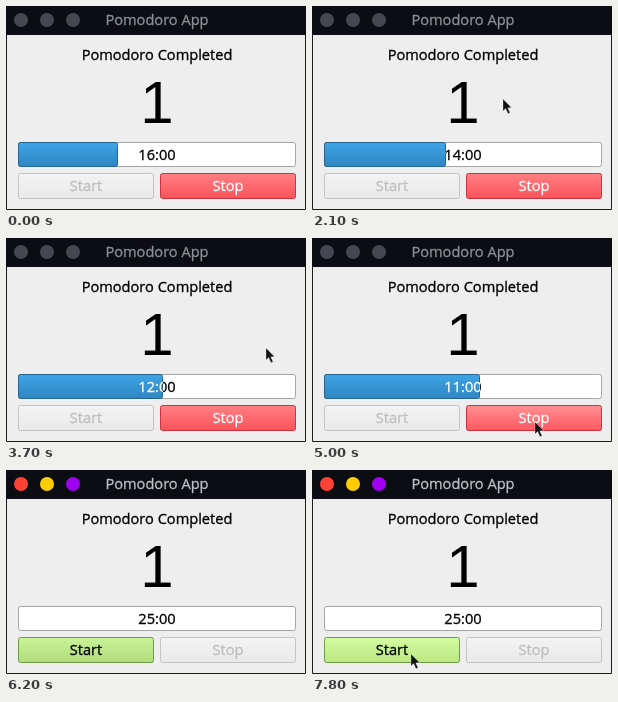
Animation, 300 px wide and 204 px high, one loop 8000 ms. Source, as an HTML page:

```html
<!DOCTYPE html>
<html lang="en">
<head>
<meta charset="utf-8">
<title>Pomodoro App</title>
<style>
  html, body { margin: 0; width: 100%; height: 100%; overflow: hidden; background: #eee; }
  svg { display: block; width: 100vw; height: 100vh; cursor: default; }
  text {
    font: 14.6px "Open Sans", "Noto Sans", sans-serif;
    text-anchor: middle; color: #000; fill: currentColor;
    stroke: currentColor; stroke-width: .3px;
  }
  .dot { fill: #454850; }
  .title { color: #8c8f98; }
  .active .title { color: #bcc0c8; }
  .active .close { fill: #ff4136; }
  .active .minimize { fill: #ffcc00; }
  .active .maximize { fill: #a000f0; }
  .count { font: 60px "Liberation Sans", Arial, sans-serif; stroke: none; }
  .button rect { fill: url(#disabled); stroke: #c4c4c4; }
  .button text { color: #bebebe; }
  .start.enabled rect { fill: url(#green); stroke: #72994a; }
  .start.enabled text { color: #000; }
  .start.enabled.hover rect { fill: url(#greenHover); }
  .stop.enabled rect { fill: url(#red); stroke: #cb3340; }
  .stop.enabled text, #bar text { color: #fff; }
  .stop.enabled.hover rect { fill: url(#redHover); }
  .stop.enabled.pressed rect { fill: #e8505a; }
</style>
</head>
<body>
<svg id="app" viewBox="0 0 300 204">
  <defs>
    <linearGradient id="disabled" x2="0" y2="1"><stop stop-color="#f3f3f3"/><stop offset="1" stop-color="#e9e9e9"/></linearGradient>
    <linearGradient id="green" x2="0" y2="1"><stop stop-color="#cbf299"/><stop offset="1" stop-color="#b0dc7a"/></linearGradient>
    <linearGradient id="greenHover" x2="0" y2="1"><stop stop-color="#d5fca1"/><stop offset="1" stop-color="#b9e781"/></linearGradient>
    <linearGradient id="red" x2="0" y2="1"><stop stop-color="#ff8083"/><stop offset="1" stop-color="#fb525a"/></linearGradient>
    <linearGradient id="redHover" x2="0" y2="1"><stop stop-color="#ff9092"/><stop offset="1" stop-color="#ff5860"/></linearGradient>
    <linearGradient id="blue" x2="0" y2="1"><stop stop-color="#3fa4e6"/><stop offset="1" stop-color="#2f86c2"/></linearGradient>
    <clipPath id="done"><rect id="doneClip" x="12" y="136" height="25"/></clipPath>
  </defs>

  <rect width="300" height="204" fill="#eee"/>
  <rect width="300" height="29" fill="#0b0d13"/>
  <path d="M.5 29V203.5H299.5V29" fill="none" stroke="#1c1c1e"/>
  <circle class="dot close" cx="15" cy="14" r="7"/>
  <circle class="dot minimize" cx="41" cy="14" r="7"/>
  <circle class="dot maximize" cx="67" cy="14" r="7"/>
  <text class="title" x="151" y="19">Pomodoro App</text>

  <text x="151" y="54">Pomodoro Completed</text>
  <text class="count" x="151" y="117">1</text>

  <rect x="12.5" y="136.5" width="277" height="24" rx="2" fill="#fff" stroke="#a5a5a5"/>
  <text class="clock" x="151" y="154"></text>
  <g id="bar">
    <rect id="chunk" x="12.5" y="136.5" height="24" rx="2" fill="url(#blue)" stroke="#27638f"/>
    <text class="clock" x="151" y="154" clip-path="url(#done)"></text>
  </g>

  <g id="start" class="button start">
    <rect x="12.5" y="167.5" width="135" height="25" rx="2"/>
    <text x="80" y="185">Start</text>
  </g>
  <g id="stop" class="button stop">
    <rect x="154.5" y="167.5" width="135" height="25" rx="2"/>
    <text x="222" y="185">Stop</text>
  </g>

  <path id="pointer" d="M0 0V12L2.7 9.6L5 14.7L7 13.8L4.8 8.9L8.4 8.5Z"
        fill="#141414" stroke="#fff" stroke-opacity=".45" stroke-width=".6"/>
</svg>

<script>
const LOOP = 8000, CLICK = 5400, RESET = 5600, LEAVE = 6200, RETURN = 6500;
const TICK = 100, TOTAL = 25;
const $ = id => document.getElementById(id);
const clocks = document.querySelectorAll(".clock");

// Places the pointer reaches, and how long each move takes.
const stops = [
  { at: 1900, over: 100, x: 186, y: 64 },
  { at: 2100, over: 100, x: 191, y: 93 },
  { at: 3200, over: 400, x: 203, y: 97 },
  { at: 3700, over: 400, x: 260, y: 110 },
  { at: 5000, over: 500, x: 223, y: 184 },
  { at: RETURN, over: 100, x: 102, y: 176 },
  { at: 7100, over: 600, x: 96, y: 161 },
  { at: 7800, over: 700, x: 99, y: 184 }
];

const clamp = p => Math.min(1, Math.max(0, p));
const ease = p => p * p * (3 - 2 * p);

function pointerAt(time) {
  const t = Math.floor(time / TICK) * TICK;
  if (t < stops[0].at || (t >= LEAVE && t < RETURN)) return null;
  let { x, y } = stops[0];
  for (const stop of stops) {
    const p = ease(clamp(1 - (stop.at - t) / stop.over));
    x += (stop.x - x) * p;
    y += (stop.y - y) * p;
  }
  return { x: Math.round(x), y: Math.round(y) };
}

function setButton(id, enabled, pointer, left) {
  const inside = pointer && pointer.x >= left && pointer.x < left + 136
    && pointer.y >= 167 && pointer.y < 193;
  $(id).classList.toggle("enabled", enabled);
  $(id).classList.toggle("hover", Boolean(inside));
}

function render(t) {
  const running = t < RESET;
  const minutes = running ? 16 - Math.floor((t + 400) / 1000) : TOTAL;
  const width = Math.round(278 * (TOTAL - minutes) / TOTAL);
  clocks.forEach(clock => clock.textContent = minutes + ":00");
  $("bar").style.display = running ? "" : "none";
  $("chunk").setAttribute("width", Math.max(0, width - 1));
  $("doneClip").setAttribute("width", width);

  const pointer = pointerAt(t);
  $("pointer").style.display = pointer ? "" : "none";
  if (pointer) $("pointer").setAttribute("transform", `translate(${pointer.x} ${pointer.y})`);

  $("app").classList.toggle("active", t >= CLICK);
  setButton("start", !running, pointer, 12);
  setButton("stop", running, pointer, 154);
  $("stop").classList.toggle("pressed", t >= CLICK && running);
}

const begin = performance.now();
function tick() {
  render((performance.now() - begin) % LOOP);
  requestAnimationFrame(tick);
}
tick();
</script>
</body>
</html>
```
